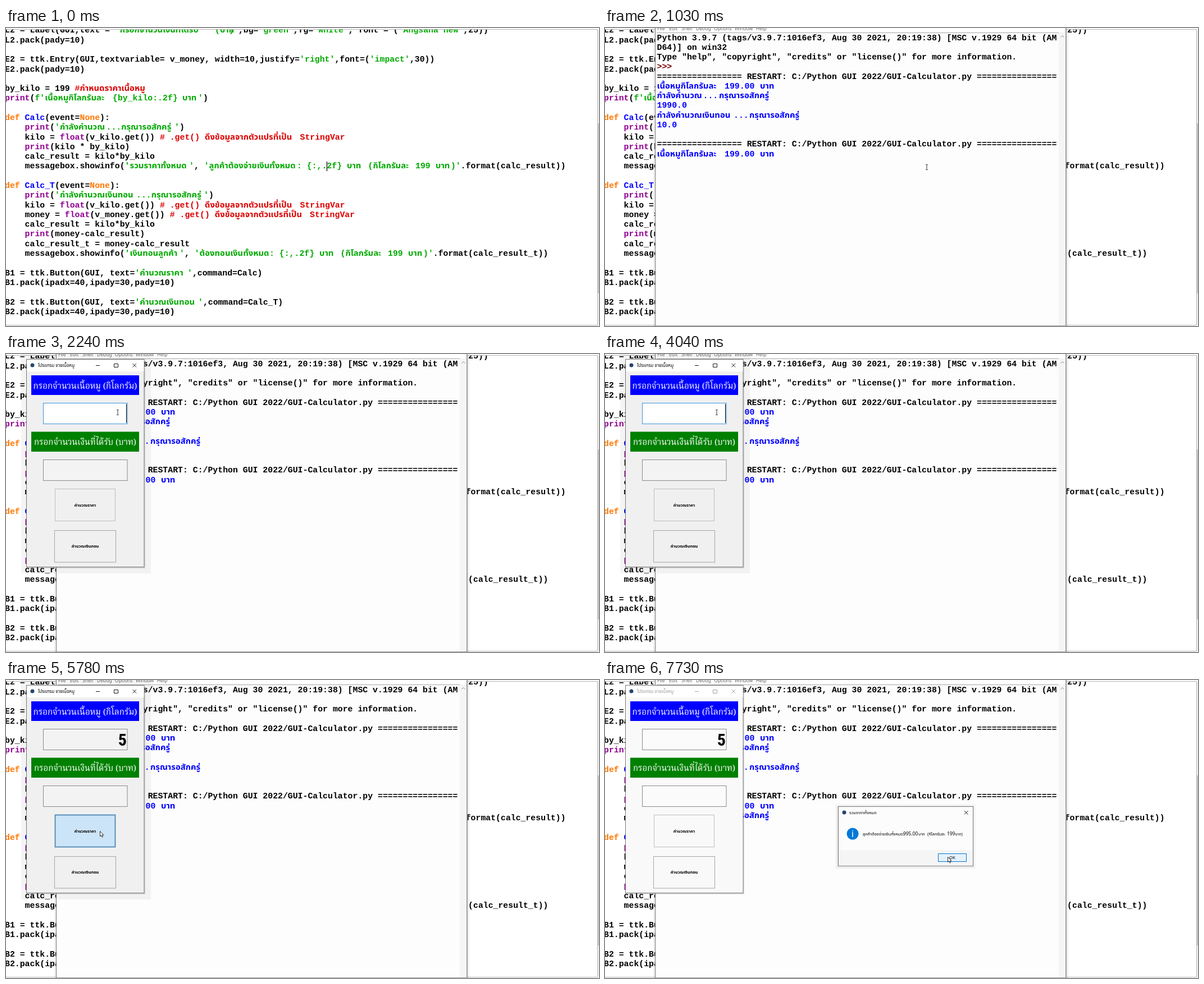
Recreate the animation shown at these times as an HTML page. Size 1056x531 px, loop 8000 ms.

```html
<!DOCTYPE html>
<html lang="th">
<head>
<meta charset="utf-8">
<title>Code editor and calculator</title>
<style>
html, body { margin: 0; width: 100%; height: 100%; overflow: hidden; background: #fff; }
svg { display: block; width: 1056px; height: 531px; }
text { white-space: pre; }
.code { font: bold 14.83px "Liberation Mono", "Noto Sans Thai", "Noto Sans", monospace; }
.ui { font-family: "Noto Sans", "Noto Sans Thai", sans-serif; }
.label { font: 15px "Noto Serif Thai", "Noto Serif", serif; }
.num { font: 900 30px Impact, "Liberation Sans Narrow", "Roboto Condensed", "Liberation Sans", sans-serif; }
</style>
</head>
<body>
<svg id="stage" viewBox="0 0 1056 531"></svg>
<script>
const NS = 'http://www.w3.org/2000/svg';
const stage = document.getElementById('stage');
const CHAR = 8.9;
const INK = { n: '#000', s: '#00aa00', k: '#ff7700', b: '#900090', d: '#0000ff', c: '#dd0000', p: '#770000' };

function el(parent, tag, attrs = {}, content) {
  const node = document.createElementNS(NS, tag);
  for (const k in attrs) node.setAttribute(k, attrs[k]);
  if (content !== undefined) node.textContent = content;
  parent.appendChild(node);
  return node;
}
const group = (parent, attrs) => el(parent, 'g', attrs);
const box = (parent, x, y, w, h, fill, stroke = 'none', sw = 1) =>
  el(parent, 'rect', { x, y, width: w, height: h, fill, stroke, 'stroke-width': sw });
const path = (parent, d, stroke, sw = 1, fill = 'none') =>
  el(parent, 'path', { d, stroke, 'stroke-width': sw, fill });
const label = (parent, x, y, size, str, more = {}) =>
  el(parent, 'text', { x, y, class: 'ui', 'font-size': size, ...more }, str);

// Parts are ink/text pairs; a number moves the pen to that x.
function row(parent, x, y, ...parts) {
  const line = el(parent, 'text', { y, class: 'code' });
  for (let i = 0; i < parts.length; i++) {
    if (typeof parts[i] === 'number') { x = parts[i]; continue; }
    const fill = INK[parts[i]], str = parts[++i];
    el(line, 'tspan', { x, fill }, str);
    x += CHAR * str.length;
  }
  return line;
}

// ---------- editor ----------
const WAIT = 'กรุณารอสักครู่', COUNT = 'กำลังคำนวณ', MEAT = 'เนื้อหมูกิโลกรัมละ';
const FETCH = 'ดึงข้อมูลจากตัวแปรที่เป็น', KILO = 'กิโลกรัมละ', BAHT = 'บาท';

box(stage, 0, 0, 1056, 531, '#fff');
const clip = el(el(stage, 'defs'), 'clipPath', { id: 'pane' });
box(clip, 0, 3, 1053, 526, '#000');
const editor = group(stage, { 'clip-path': 'url(#pane)' });
const line = (n, ...parts) => row(editor, -2, 164 + (n - 9) * 17.29, ...parts);

line(0, 'n', 'L2 = Label(GUI,text = ', 's', "'", 's', 'กรอกจำนวนเงินที่ได้รับ', 372, 's', '(', 's', BAHT, 397, 's', ')',
  405, 's', "'", 'n', ',bg=', 's', "'green'", 'n', ',fg=', 's', "'white'", 'n', ', font = (', 's', "'Angsana new'", 'n', ',25))');
line(1, 'n', 'L2.pack(pady=10)');
line(3, 'n', 'E2 = ttk.Entry(GUI,textvariable= v_money, width=10,justify=', 's', "'right'", 'n', ',font=(', 's', "'impact'", 'n', ',30))');
line(4, 'n', 'E2.pack(pady=10)');
line(6, 'n', 'by_kilo = 199 ', 'c', '#', 'c', 'กำหนดราคาเนื้อหมู');
line(7, 'b', 'print', 'n', '(', 's', "f'", 's', MEAT, 190, 's', '{by_kilo:.2f}', 314, 's', BAHT, 342, 's', "'", 'n', ')');
line(9, 'k', 'def ', 'd', 'Calc', 'n', '(event=', 'k', 'None', 'n', '):');
line(10, 'b', '    print', 'n', '(', 's', "'", 's', COUNT, 178.5, 's', '...', 's', WAIT, 300, 's', "'", 'n', ')');
line(12, 'b', '    print', 'n', '(kilo * by_kilo)');
for (const n of [13, 20]) line(n, 'n', '    calc_result = kilo*by_kilo');
for (const n of [11, 18])
  line(n, 'n', '    kilo = ', 'b', 'float', 'n', '(v_kilo.get()) ', 'c', '# .get() ', 'c', FETCH, 523.5, 'c', 'StringVar');
line(14, 'n', '    messagebox.showinfo(', 's', "'", 's', 'รวมราคาทั้งหมด', 326, 's', "'", 'n', ', ', 's', "'",
  's', 'ลูกค้าต้องจ่ายเงินทั้งหมด', 518, 's', ': {:,.2f}', 607, 's', BAHT, 644.5, 's', '(', 's', KILO, 729, 's', '199',
  765, 's', BAHT, 792, 's', ")'", 'n', '.format(calc_result))');
line(16, 'k', 'def ', 'd', 'Calc_T', 'n', '(event=', 'k', 'None', 'n', '):');
line(17, 'b', '    print', 'n', '(', 's', "'", 's', COUNT + 'เงินทอน', 232, 's', '...', 's', WAIT, 352, 's', "'", 'n', ')');
line(19, 'n', '    money = ', 'b', 'float', 'n', '(v_money.get()) ', 'c', '# .get() ', 'c', FETCH, 541, 'c', 'StringVar');
line(21, 'b', '    print', 'n', '(money-calc_result)');
line(22, 'n', '    calc_result_t = money-calc_result');
line(23, 'n', '    messagebox.showinfo(', 's', "'", 's', 'เงินทอนลูกค้า', 309, 's', "'", 'n', ', ', 's', "'",
  's', 'ต้องทอนเงินทั้งหมด', 469, 's', ': {:,.2f}', 558, 's', BAHT, 595.5, 's', '(', 's', KILO, 680, 's', '199',
  716, 's', BAHT, 743, 's', ")'", 'n', '.format(calc_result_t))');
line(25, 'n', 'B1 = ttk.Button(GUI, text=', 's', "'", 's', 'คำนวณราคา', 323, 's', "'", 'n', ',command=Calc)');
line(26, 'n', 'B1.pack(ipadx=40,ipady=30,pady=10)');
line(28, 'n', 'B2 = ttk.Button(GUI, text=', 's', "'", 's', 'คำนวณเงินทอน', 342, 's', "'", 'n', ',command=Calc_T)');
line(29, 'n', 'B2.pack(ipadx=40,ipady=30,pady=10)');

path(stage, 'M0 2.5H1053.5V529.5H0', '#b4b4b4');
box(stage, 1054, 3, 2, 526, '#f0f0f0');
box(stage, 1054, 170, 2, 303, '#c4c4c4');
const editCaret = path(stage, 'M571.5 238V255', '#000', 1.2);

// ---------- shell ----------
const shell = group(stage);
box(shell, 86, 0, 739, 531, '#000').setAttribute('opacity', 0.06);
box(shell, 89, 0, 732, 531, '#fdfdfd');
path(shell, 'M89.5 0V531', '#777');
path(shell, 'M821 0V531', '#a0a0a0', 2);
path(shell, 'M90 530.5H820', '#999');
box(shell, 90, 0, 730, 7, '#fff');
path(shell, 'M92 8.5H808', '#a8a8a8');
box(shell, 808, 8, 12, 522, '#f5f5f5');
path(shell, 'M811.5 16.5L814.5 13.5L817.5 16.5', '#888');
[['File', 93], ['Edit', 114], ['Shell', 136], ['Debug', 162], ['Options', 194], ['Window', 231], ['Help', 269]]
  .forEach(([s, x]) => label(shell, x, 4, 8.5, s, { fill: '#666' }));

const out = (n, ...parts) => row(shell, 92.5, 21.5 + n * 17.27, ...parts);
const restart = n => out(n, 'n', '='.repeat(17) + ' RESTART: C:/Python GUI 2022/GUI-Calculator.py ' + '='.repeat(16));
const price = n => out(n, 'd', MEAT, 213, 'd', '199.00', 276, 'd', BAHT);
const working = n => out(n, 'd', COUNT, 174.5, 'd', '...', 203, 'd', WAIT);
out(0, 'n', 'Python 3.9.7 (tags/v3.9.7:1016ef3, Aug 30 2021, 20:19:38) [MSC v.1929 64 bit (AM');
out(1, 'n', 'D64)] on win32');
out(2, 'n', 'Type "help", "copyright", "credits" or "license()" for more information.');
out(3, 'p', '>>>');
restart(4);
price(5);
working(6);
out(7, 'd', '1990.0');
out(8, 'd', COUNT + 'เงินทอน', 229, 'd', '...', 257, 'd', WAIT);
out(9, 'd', '10.0');
const restart2 = restart(11), price2 = price(12), working2 = working(13);

// ---------- calculator window ----------
const app = group(stage);
const glow = box(app, 27, 0, 231, 391, '#000');
glow.setAttribute('opacity', 0.045);
box(app, 37, 11, 211, 371, '#000').setAttribute('opacity', 0.13);
const face = box(app, 36.5, 9.5, 209.5, 370, '#f0f0f0', '#777');
box(app, 37, 10, 208.5, 21, '#fff');
el(app, 'circle', { cx: 47, cy: 20, r: 3.5, fill: '#24466f' });
const bar = group(app, { color: '#000' });
label(bar, 57, 23, 8, 'โปรแกรม ขายเนื้อหมู', { fill: 'currentColor' });
path(bar, 'M160 20.5H167M192.5 17.5H199.5V23.5H192.5ZM225.5 17L232 23.5M232 17L225.5 23.5', 'currentColor', 0.9);

function caption(y, h, fill, str) {
  box(app, 45, y, 192, h, fill);
  el(app, 'text', { x: 141, y: y + 23.5, class: 'label', fill: '#fff', 'text-anchor': 'middle' }, str);
}
caption(38, 35, '#0000ff', 'กรอกจำนวนเนื้อหมู (กิโลกรัม)');
caption(138.5, 35.5, '#008000', 'กรอกจำนวนเงินที่ได้รับ (บาท)');
const entry = box(app, 66.5, 87.5, 149.5, 37, '#f3f3f3', '#8a8a8a');
const entry2 = box(app, 66.5, 188.5, 149.5, 37, '#f3f3f3', '#8a8a8a');
const five = el(app, 'text', { x: 215, y: 117, class: 'num', 'text-anchor': 'end' }, '5');
const caret = path(app, 'M214.5 89V123', '#000');
const btn = box(app, 87.5, 240.5, 107, 57, '#efefef', '#bdbdbd');
const btn2 = box(app, 86.5, 314.5, 109, 56.5, '#efefef', '#a4a4a4');
const mid = { 'text-anchor': 'middle', 'font-weight': 600 };
label(app, 141, 272, 7.4, 'คำนวณราคา', mid);
label(app, 141, 345, 7.4, 'คำนวณเงินทอน', mid);

// ---------- message box ----------
const dialog = group(stage);
[[5, 0.025], [3, 0.04], [1, 0.07]].forEach(([d, o]) =>
  box(dialog, 415 - d, 225 - d + 1, 240 + 2 * d, 106 + 2 * d, '#000').setAttribute('opacity', o));
box(dialog, 415.5, 225.5, 240, 105.5, '#fcfcfc', '#777');
box(dialog, 416, 303, 239, 27.5, '#f5f5f5');
el(dialog, 'circle', { cx: 426, cy: 236, r: 3.5, fill: '#24466f' });
label(dialog, 435, 239, 7.5, 'รวมราคาทั้งหมด');
path(dialog, 'M640 233L646.5 239.5M646.5 233L640 239.5', '#000', 0.9);
el(dialog, 'circle', { cx: 441, cy: 274, r: 10.5, fill: '#0078d7' });
label(dialog, 441, 280, 17, 'i', { fill: '#fff', 'text-anchor': 'middle' });
[[459, 'ลูกค้าต้องจ่ายเงินทั้งหมด:', 7.3], [531, '995.00', 8.4], [558, BAHT, 7.3],
  [574, '(' + KILO, 7.3], [609, '199', 8.4], [619 + 4.5, BAHT + ')', 7]]
  .forEach(([x, s, size]) => label(dialog, x, 277, size, s));
const ok = box(dialog, 593.5, 309.5, 50, 14, '#eee', '#0078d7', 1.6);
label(dialog, 618.5, 319.3, 7.8, 'OK', { 'text-anchor': 'middle' });

// ---------- pointers ----------
const beam = group(stage);
path(beam, 'M-2 -4.5H-.6L0 -4L.6 -4.5H2M0 -4V4M-2 4.5H-.6L0 4L.6 4.5H2', '#222', 0.9);
const arrow = group(stage);
path(arrow, 'M0 0V9L2 7.2L3.5 10.4L5 9.8L3.6 6.7H6.4Z', '#000', 0.8, '#fff');

// ---------- timeline ----------
const LOOP = 8000;
const BEAM = [[500, 573, 248], [1520, 571, 244], [1640, 551, 236], [1760, 500, 213], [1880, 370, 187],
  [2000, 262, 145], [2120, 222, 114], [2240, 199, 104]];
const ARROW = [[4690, 218, 126], [4940, 219, 130], [5060, 218, 150], [5180, 212, 188], [5300, 199, 226],
  [5420, 182, 256], [5540, 172, 269], [5660, 167.5, 269.5], [6900, 176, 273.5], [7050, 179, 273.5],
  [7190, 396, 305], [7340, 500, 333], [7460, 577, 331], [7590, 607, 318], [7730, 610.5, 315.5]];
const BLINK = [2240, 2770, 3140, 3670, 4040, 5180, 5540, 5780];

const show = (node, on) => node.setAttribute('opacity', +on);
const held = (steps, t) => steps.filter(s => s[0] <= t).pop();
const fade = (t, start, full) => t < start ? 0 : t < full ? 0.6 : 1;
const paint = (node, fill, stroke, sw = 1) => {
  node.setAttribute('fill', fill);
  node.setAttribute('stroke', stroke);
  node.setAttribute('stroke-width', sw);
};
function place(node, steps, t, on) {
  const s = held(steps, t);
  show(node, on && s);
  if (s) node.setAttribute('transform', `translate(${s[1]} ${s[2]})`);
}
const on = (node, flag) => show(node, flag ? 1 : 0);

function draw(t) {
  on(editCaret, t < 500);
  show(shell, fade(t, 500, 630));
  on(restart2, t >= 880);
  on(price2, t >= 1030);
  on(working2, t >= 5910);

  const idle = t >= 6030;
  const base = idle ? '#f9f9f9' : '#f0f0f0';
  const field = idle ? '#fbfbfb' : '#f3f3f3';
  show(app, fade(t, 1150, 1270));
  show(glow, idle ? 0 : 0.045);
  face.setAttribute('fill', base);
  bar.setAttribute('color', idle ? '#999' : '#000');
  const focus = t >= 2240 && t < 5780;
  paint(entry, focus ? '#fff' : field, focus ? '#3c94dc' : '#8a8a8a');
  entry2.setAttribute('fill', field);
  on(caret, BLINK.filter(b => b <= t).length % 2);
  on(five, t >= 4570);
  if (t >= 5780 && t < 5910) paint(btn, '#cce4f7', '#4f87b3', 1.8);
  else if (t >= 5540 && t < 5780) paint(btn, '#e5f1fb', '#0078d7');
  else paint(btn, base, '#bdbdbd');
  btn2.setAttribute('fill', base);

  show(dialog, fade(t, 6030, 6160));
  if (t >= 7590) paint(ok, t < 7730 ? '#ebf1f6' : '#e5f1fb', '#0078d7');
  else paint(ok, '#eee', '#0078d7', 1.6);

  const pointing = t >= 4690;
  beam.style.display = t >= 500 && !pointing ? '' : 'none';
  arrow.style.display = pointing ? '' : 'none';
  if (pointing) place(arrow, ARROW, t, 1);
  else place(beam, BEAM, t, 1);
}

let start;
function tick(now) {
  start ??= now;
  draw((now - start) % LOOP);
  requestAnimationFrame(tick);
}
draw(0);
requestAnimationFrame(tick);
</script>
</body>
</html>
```
